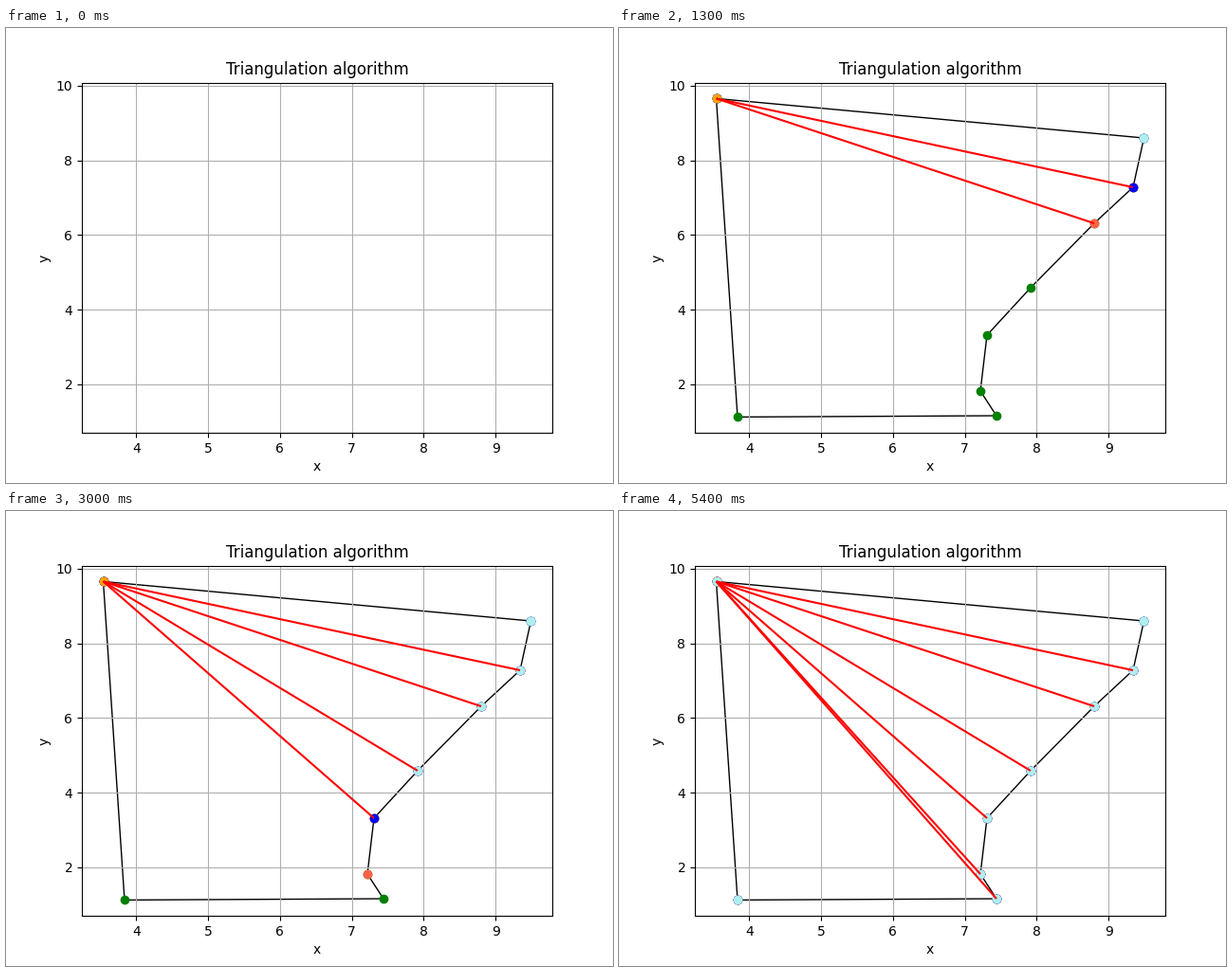
A matplotlib script for the animation above (5500 ms loop, 640 px wide and 480 px high).

```python
import matplotlib.pyplot as plt
from matplotlib.animation import FuncAnimation
from matplotlib.collections import LineCollection
from matplotlib.patches import Polygon

FRAMES, INTERVAL = 55, 100
STACK, CURRENT, TESTED, DONE = "blue", "tomato", "orange", "paleturquoise"

# Vertices from top to bottom, which is also their order around the polygon.
POINTS = [
    (3.540, 9.655), (9.492, 8.598), (9.341, 7.278),
    (8.800, 6.312), (7.915, 4.585), (7.308, 3.315),
    (7.216, 1.817), (7.440, 1.156), (3.836, 1.121),
]
APEX, LAST = 0, len(POINTS) - 1

plt.rcParams["font.family"] = "DejaVu Sans"
fig, ax = plt.subplots(figsize=(6.4, 4.8), dpi=100)


def padded(values, margin=0.05):
    low, high = min(values), max(values)
    pad = margin * (high - low)
    return low - pad, high + pad


xs, ys = zip(*POINTS)
ax.set(title="Triangulation algorithm", xlabel="x", ylabel="y",
       xlim=padded(xs), ylim=padded(ys))
ax.grid(True)

steps = []  # (frame on which it appears, artist)


def add(frame, artist):
    artist.set_visible(False)
    steps.append((frame, artist))


def mark(frame, vertex, color):
    add(frame, ax.scatter(*POINTS[vertex], color=color))


def diagonal(frame, a, b):
    lines = LineCollection([[POINTS[a], POINTS[b]]], colors="red")
    add(frame, ax.add_collection(lines, autolim=False))


def build():
    add(1, ax.add_patch(Polygon(POINTS, fill=False, edgecolor="black")))
    add(2, ax.scatter(xs, ys, color="green"))
    mark(3, APEX, STACK)
    mark(4, 1, STACK)

    # The right chain: each vertex cuts off a triangle with the apex.
    frame = 5
    for v in range(2, LAST):
        mark(frame, v, CURRENT)
        mark(frame + 1, APEX, TESTED)
        diagonal(frame + 2, APEX, v)
        mark(frame + 3, v - 1, DONE)
        mark(frame + 4, APEX, STACK)
        mark(frame + 5, v, STACK)
        frame += 6

    # The last vertex closes the other chain and empties the stack.
    for offset, v, color in [
        (0, LAST, CURRENT), (1, LAST - 1, TESTED), (2, LAST - 1, DONE),
        (3, APEX, TESTED), (6, APEX, DONE), (7, LAST - 1, STACK),
        (8, LAST, STACK), (10, LAST - 1, DONE), (13, LAST, DONE),
    ]:
        mark(frame + offset, v, color)


def update(frame):
    for start, artist in steps:
        artist.set_visible(start <= frame)
    return [artist for _, artist in steps]


build()
anim = FuncAnimation(fig, update, frames=FRAMES, interval=INTERVAL,
                     repeat=True, repeat_delay=0, blit=False)
plt.show()
```
